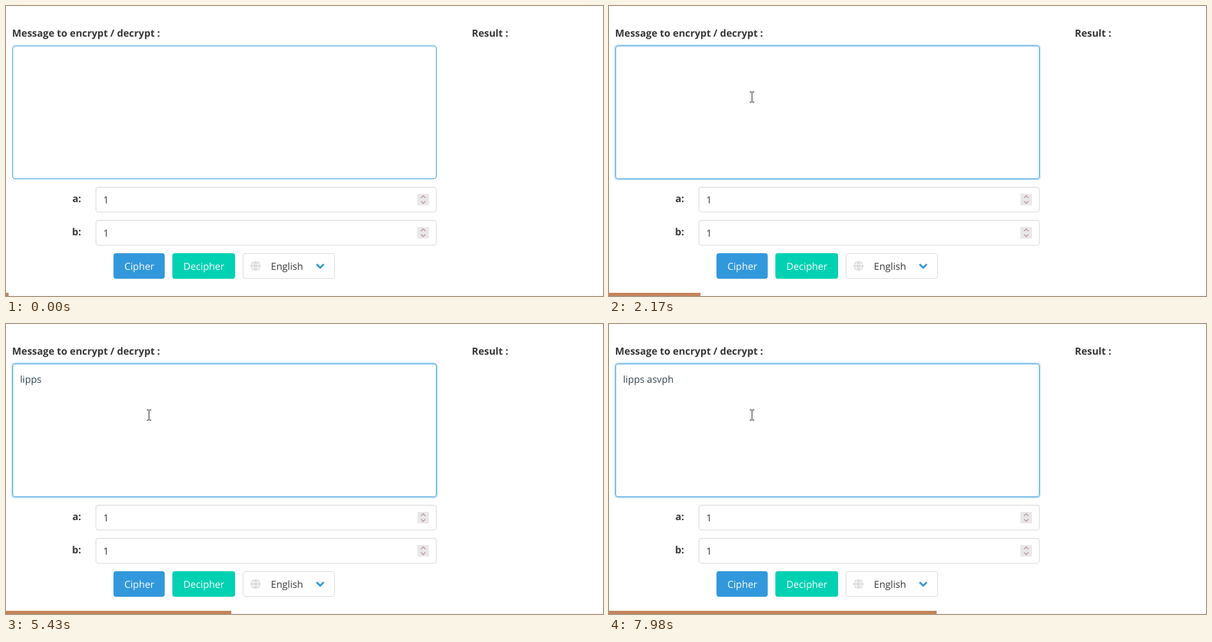
These frames come from a looping animation (933x454 px, 8 s). An HTML page:

```html
<!DOCTYPE html>
<html lang="en">
<head>
<meta charset="utf-8">
<title>Affine cipher form</title>
<style>
  html, body { margin: 0; width: 100%; height: 100%; overflow: hidden; background: #fff; }
  .stage { position: relative; width: 933px; height: 454px; overflow: hidden; }
  .stage > * { position: absolute; box-sizing: border-box; }
  .box { border: 1px solid #dbdbdb; border-radius: 4px; }
  .message { left: 10px; top: 62px; width: 663px; height: 209px; border-color: #3298dc; }
  .message.focus { box-shadow: 0 0 0 2px rgba(50, 152, 220, .25); }
  .field { left: 140px; width: 533px; height: 40px; box-shadow: inset 0 1px 2px rgba(10, 10, 10, .05); }
  .button { top: 387px; height: 40px; border-radius: 4px; }
  .cipher { left: 168px; width: 80px; background: #3298dc; }
  .decipher { left: 260px; width: 98px; background: #00d1b2; }
  .select { left: 370px; width: 144px; }
  .select.hover { border-color: #b5b5b5; }
  .footer { left: 0; top: 451px; width: 933px; height: 3px; background: #fafafa; }
  .bar { left: 0; top: 449px; width: 4px; height: 5px; background: #c4845b; }
  svg { left: 0; top: 0; }
  text { font: 15.2px "Open Sans", "Noto Sans", sans-serif; fill: #363636; text-rendering: geometricPrecision; }
  .label { font-size: 15.4px; font-weight: 700; }
  .white { fill: #fff; text-anchor: middle; }
  #typed { font-size: 15.1px; fill: #304655; white-space: pre; }
</style>
</head>
<body>
<div class="stage">
  <div id="message" class="box message"></div>
  <div class="box field" style="top:283px"></div>
  <div class="box field" style="top:335px"></div>
  <div class="button cipher"></div>
  <div class="button decipher"></div>
  <div id="select" class="box button select"></div>
  <div class="footer"></div>
  <div id="bar" class="bar"></div>

  <svg width="933" height="454" viewBox="0 0 933 454">
    <defs>
      <g id="spinner" fill="none" stroke="#b5968c" stroke-width="1.3">
        <rect x="643" y="294" width="18" height="18" fill="#e9e7ea" stroke="none"/>
        <path d="M648.5 300.5l3.5-3.5 3.5 3.5M648.5 305.5l3.5 3.5 3.5-3.5"/>
      </g>
    </defs>

    <text class="label" x="9.6" y="48">Message to encrypt / decrypt :</text>
    <text class="label" x="728" y="48">Result :</text>
    <text class="label" x="117.5" y="307" text-anchor="end">a:</text>
    <text class="label" x="117.5" y="359" text-anchor="end">b:</text>
    <text x="152" y="309">1</text>
    <text x="152" y="361">1</text>
    <use href="#spinner"/>
    <use href="#spinner" y="52"/>
    <text class="white" x="208.3" y="413">Cipher</text>
    <text class="white" x="309.3" y="413">Decipher</text>
    <text x="414" y="413">English</text>

    <circle cx="390" cy="407" r="7.8" fill="#dbdbdb"/>
    <path d="M382 404.2h16M382 409.8h16" stroke="#fff"/>
    <ellipse cx="390" cy="407" rx="4" ry="8.3" fill="none" stroke="#fff"/>
    <path d="M485.4 404.2l5.6 5.5 5.6-5.5" fill="none" stroke="#3298dc" stroke-width="3"/>

    <text id="typed" x="22" y="92"></text>
    <rect id="caret" y="75" width="1" height="21" fill="#000"/>

    <g id="pointer">
      <path id="beam" d="M-3 -7.5h3M1 -7.5h3M.5 -7v15M-3 8.5h3M1 8.5h3" fill="none" stroke="#222"/>
      <path id="arrow" d="M.5 .5v16l3.7-3.5 2.4 5.6 2.2-1-2.4-5.4h5.1z" fill="#fff" stroke="#000"/>
      <path id="hand" d="M-1.5 9v-8q1.5-2 3 0v5.500l7 1.500q2 .5 2 3v3l-2 5h-8l-5.500-7.500q0-2 2-1.500z" fill="#fff" stroke="#000"/>
    </g>
  </svg>
</div>

<script>
const LOOP = 8000;
const BAR_STEP = 4.34;
const CLICK = 1220;
const BLINK = 530;
const TEXT = "lipps asvph";
const KEY_TIMES = [2500, 2820, 3090, 3230, 3500, 4700, 5690, 5900, 5960, 7100, 7300];

// Bursts of evenly spaced screen updates: first, last, count
const BURSTS = [
  [70, 820, 12], [890, 1690, 13], [1760, 2550, 13], [2620, 3370, 12], [3430, 4190, 12],
  [4260, 5020, 12], [5090, 5830, 12], [5900, 6700, 12], [6770, 7570, 13], [7640, 7980, 6]
];
const updates = [0];
for (const [first, last, count] of BURSTS) {
  for (let i = 0; i < count; i++) {
    updates.push(Math.round((first + (last - first) * i / (count - 1)) / 10) * 10);
  }
}

const el = id => document.getElementById(id);
const show = (id, visible) => el(id).setAttribute("visibility", visible ? "visible" : "hidden");
const between = (value, low, high) => value >= low && value < high;
const bezier = (s, a, b, c) => a * (1 - s) ** 2 + 2 * b * s * (1 - s) + c * s * s;

function drawPointer(time) {
  const u = Math.min(Math.max((time - 70) / 1080, 0), 1);
  const s = 1 - (1 - u) ** 1.2;
  const x = Math.round(bezier(s, 445, 420, 223));
  const y = Math.round(bezier(s, 462, 300, 142));
  const onSelect = between(y, 387, 427);
  const onText = between(y, 62, 271) || between(y, 283, 323) || between(y, 335, 375);
  el("pointer").setAttribute("transform", `translate(${x} ${y})`);
  el("select").classList.toggle("hover", onSelect);
  show("hand", onSelect);
  show("beam", onText);
  show("arrow", !onSelect && !onText);
}

function drawTyping(time) {
  const count = KEY_TIMES.filter(key => key <= time).length;
  const lastInput = count ? KEY_TIMES[count - 1] : CLICK;
  const typed = el("typed");
  typed.textContent = TEXT.slice(0, count);
  const width = count ? typed.getComputedTextLength() : 0;
  el("caret").setAttribute("x", Math.round(22 + width));
  show("caret", time >= CLICK && Math.floor((time - lastInput) / BLINK) % 2 === 0);
  el("message").classList.toggle("focus", time >= CLICK);
}

let start, shown = -1;
function tick(now) {
  start ??= now;
  const time = (now - start) % LOOP;
  const index = updates.filter(update => update <= time).length - 1;
  if (index !== shown) {
    shown = index;
    el("bar").style.width = Math.round(BAR_STEP * (index + 1)) + "px";
    drawPointer(updates[index]);
    drawTyping(updates[index]);
  }
  requestAnimationFrame(tick);
}
tick(performance.now());
</script>
</body>
</html>
```
